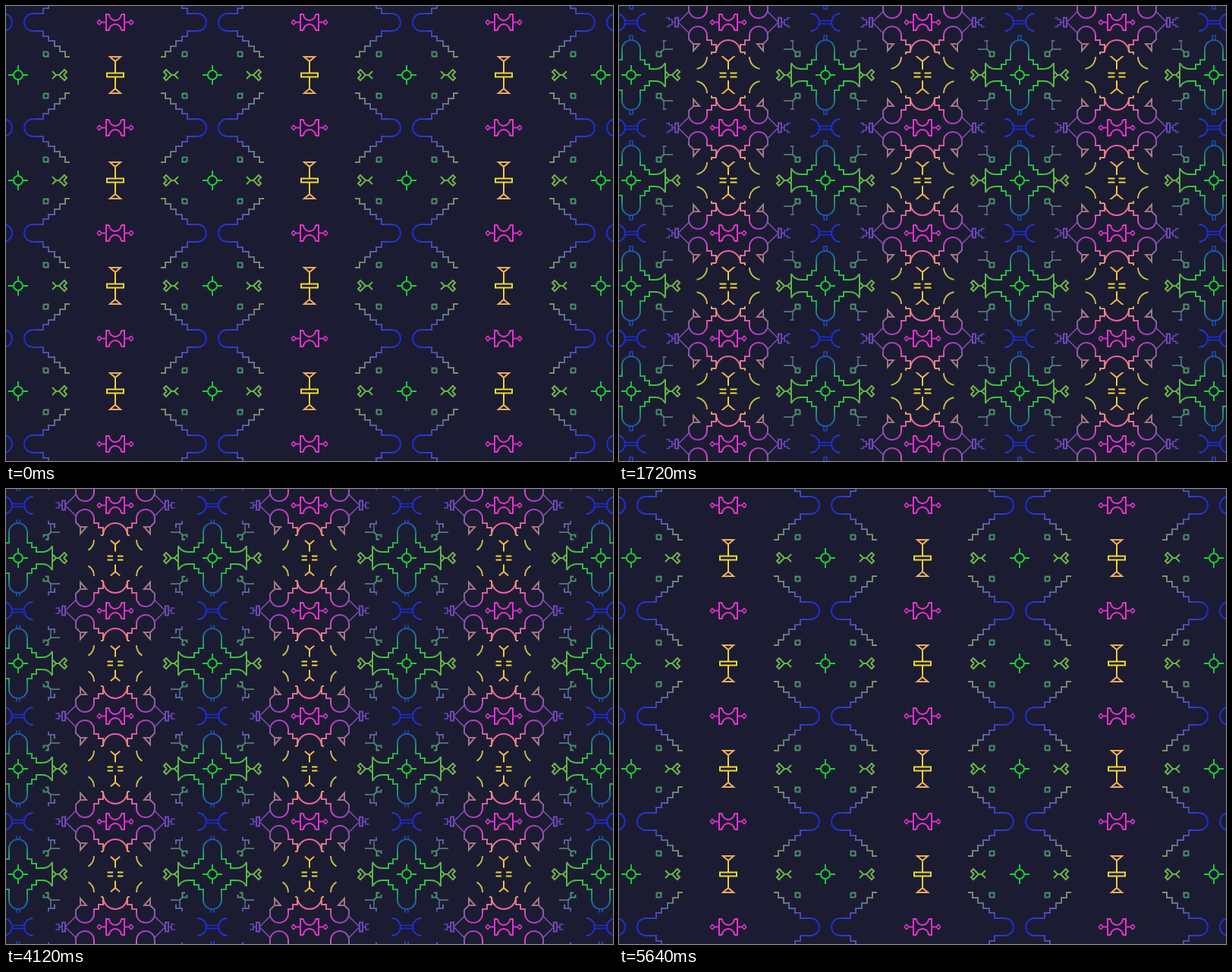
These frames come from a looping animation (800 by 600 pixels, 5760 ms). An HTML page with a canvas:

```html
<!DOCTYPE html>
<html lang="en">
<head>
<meta charset="utf-8">
<title>Line pattern</title>
<style>
  html, body { margin: 0; width: 100%; height: 100%; overflow: hidden; background: #1b1c32; }
  canvas { display: block; }
</style>
</head>
<body>
<canvas id="stage" width="800" height="600"></canvas>
<script>
const BG = '#1b1c32';
const LOOP = 5760, STEP = 40, LAST = 55, OUT = 160, BACK = 3480;
// The tile is one quarter cell, mirrored over x = 144 and y = 160.5.
const TILE = { x: 16, y: 91, w: 256, h: 139 };

const parts = [];

// A line shrinks to the point at share c of its length; keys are [step, shown share].
function line(d, keys = [[0, 1]], c = 0, width = 2, closing = false) {
  const el = document.createElementNS('http://www.w3.org/2000/svg', 'path');
  el.setAttribute('d', d);
  parts.push({ path: new Path2D(d), len: el.getTotalLength(), keys, c, width, closing });
}
const grow = (d, from, to, width) => line(d, [[from, 0], [to, 1]], 0, width);
const close = (d, from, to) => line(d, [[from, 0], [to, 1]], 0.5, 2, true);

// Magenta emblem
line('M156 160.5 V150 H152');
line('M152 150 A8 8 0 0 1 144 158', [[10, 1], [18, 0], [21, 0], [29, 1]]);
line('M156 160.5 H162 L165 157.5 L168 160.5', [[14, 1], [18, 0.78], [20, 0.7], [25, 1]], 0, 1.6);

// Yellow column
const column = [[13, 1], [18, 0.55], [24, 0], [32, 0], [38, 0.55], [40, 0.63], [45, 1]];
line('M144 115 H151 L144 109 V93.5', column, 0.57);
line('M144 93.5 H155 V91', column, 0.5);

// Green target
line('M266 91 A6 6 0 0 0 272 97');
line('M266 91 H259', [[14, 1], [18, 0.55], [20, 0.3], [26, 1]]);
line('M272 97 V104', [[12, 1], [17, 0], [20, 0], [26, 1]]);

// Green arrow and cross outline
line('M218 91 H222 L227 96', [[7, 1], [13, 0], [23, 0], [28, 1]]);
line('M212 91 L208 95 L211 98 L218 91', [[11, 1], [18, 0.2], [19, 0.2], [25, 1]], 0.5);
grow('M227 91 V107', 4, 14);
grow('M227 107 A15 15 0 0 1 241 99 H248 V105 H254 V111 H260 V125 A12 12 0 0 0 272 137', 14, 37);
grow('M270 137 V143 H272', 35, 40, 1.6);

// Small square with its fork
line('M232.5 121.5 H238.5 V115.5', [[24, 1], [30, 0], [32, 0], [38, 0.8], [40, 1]]);
line('M232.5 121.5 V115.5 H238.5', [[24, 1], [30, 0], [32, 0], [38, 0.8], [40, 1]]);
grow('M232.5 121.5 L229 125', 29, 32);
grow('M229 125 H217', 32, 37, 1.6);
grow('M229 125 V136', 32, 37, 1.6);

// Blue bulge and bar
line('M252.5 149 A11.5 11.5 0 0 1 264 160.5');
grow('M264 158.5 H272', 24, 30, 1.6);

// Stairs: shrink to the middle, then close again from their joints
line('M204 115 H210 V122 H217 V129 H224 V136 H232 V142 H239 V149 H252.5',
  [[24, 1], [38, 0.21], [40, 0.06], [41.5, 0], [60, 0]], 0.55);
close('M204 115 H210 V122 H217 V125', 49, 54);
close('M217 125 V129 H224 V136 H229', 45, 50);
close('M229 136 H232 V142 H239 V149 H252.5', 45, 53);

// Corner triangle and magenta outline
grow('M190 123 L182 132 H190 Z', 1, 11);
grow('M190 132 L196 138 V141', 11, 17);
grow('M196 141 V143 A12 12 0 0 1 172 143 V137 H166 V131 H160 V121', 19, 35);
grow('M144 137 A16 16 0 0 0 160 121', 28, 37);
grow('M160 121 H166 V115 H172', 37, 43);

// Purple link and head
grow('M196 141 V146.5 L210 160.5', 20, 28, 1.6);
grow('M210 160.5 V154.5 H214 V160.5', 28, 34);
grow('M214 160.5 H218 V157 H222 V154.5 H224 A6 6 0 0 1 230 160.5', 34, 42.5, 1.6);

// Yellow arch and bars
grow('M172 115 A16 16 0 0 1 204 115', 33, 48.7);
grow('M186 99 V91', 42, 46, 1.6);
grow('M190 99 V91', 42, 46, 1.6);

function shownShare(keys, s) {
  if (s <= keys[0][0]) return keys[0][1];
  for (let i = 1; i < keys.length; i++) {
    const [s0, p0] = keys[i - 1], [s1, p1] = keys[i];
    if (s <= s1) return p0 + (p1 - p0) * (s - s0) / (s1 - s0);
  }
  return keys[keys.length - 1][1];
}

function makeCanvas() {
  const c = document.createElement('canvas');
  c.width = TILE.w;
  c.height = TILE.h;
  return c;
}

// Colour field: one hue per corner of the quarter cell, greyer half way across.
function makeField() {
  const yellow = [240, 217, 46], green = [30, 205, 50];
  const pink = [240, 45, 210], blue = [26, 42, 216], grey = [90, 120, 120];
  const smooth = f => f * f * (3 - 2 * f);
  const mix = (a, b, k) => a + (b - a) * k;
  const c = makeCanvas(), g = c.getContext('2d');
  const img = g.createImageData(TILE.w, TILE.h);
  for (let y = 0, i = 0; y < TILE.h; y++) {
    const fy = smooth(1 - Math.abs(y + 0.5 - 69.5) / 69.5);
    for (let x = 0; x < TILE.w; x++, i += 4) {
      const fx = smooth(Math.abs(x + 0.5 - 128) / 128);
      const k = 0.35 * (4 * fx * (1 - fx)) ** 2;
      for (let n = 0; n < 3; n++) {
        const v = mix(mix(yellow[n], green[n], fx), mix(pink[n], blue[n], fx), fy);
        img.data[i + n] = mix(v, grey[n], k);
      }
      img.data[i + 3] = 255;
    }
  }
  g.putImageData(img, 0, 0);
  return c;
}

const field = makeField();
const tile = makeCanvas();
const tg = tile.getContext('2d');
const stage = document.getElementById('stage').getContext('2d');

function strokeRange(part, a, b) {
  if (b - a < 0.05) return;
  const whole = a <= 0 && b >= part.len;
  tg.setLineDash(whole ? [] : [b - a, 9999]);
  tg.lineDashOffset = -a;
  tg.stroke(part.path);
}

function strokePart(part, s) {
  const p = shownShare(part.keys, s);
  if (p <= 0) return;
  const q = part.closing ? 1 - p : p;
  const mid = part.len * part.c;
  const a = mid * (1 - q), b = mid + (part.len - mid) * q;
  tg.lineWidth = part.width;
  if (part.closing) {
    strokeRange(part, 0, a);
    strokeRange(part, b, part.len);
  } else {
    strokeRange(part, a, b);
  }
}

function draw(s) {
  tg.setTransform(1, 0, 0, 1, 0, 0);
  tg.globalCompositeOperation = 'source-over';
  tg.clearRect(0, 0, TILE.w, TILE.h);
  tg.strokeStyle = '#fff';
  for (const mx of [1, -1]) {
    for (const my of [1, -1]) {
      tg.setTransform(mx, 0, 0, my,
        (mx > 0 ? 0 : 288) - TILE.x, (my > 0 ? 0 : 321) - TILE.y);
      for (const part of parts) strokePart(part, s);
    }
  }
  tg.setTransform(1, 0, 0, 1, 0, 0);
  tg.globalCompositeOperation = 'source-in';
  tg.drawImage(field, 0, 0);
  tg.globalCompositeOperation = 'destination-over';
  tg.fillStyle = BG;
  tg.fillRect(0, 0, TILE.w, TILE.h);

  for (let y = TILE.y - TILE.h; y < 600; y += TILE.h) {
    for (let x = TILE.x - TILE.w; x < 800; x += TILE.w) stage.drawImage(tile, x, y);
  }
}

function stepAt(t) {
  const count = from => Math.min(LAST, Math.max(0, Math.floor((t - from) / STEP) + 1));
  return count(OUT) - count(BACK);
}

const start = performance.now();
let shown = -1;
function tick() {
  const s = stepAt((performance.now() - start) % LOOP);
  if (s !== shown) draw(shown = s);
  requestAnimationFrame(tick);
}
tick();
</script>
</body>
</html>
```
